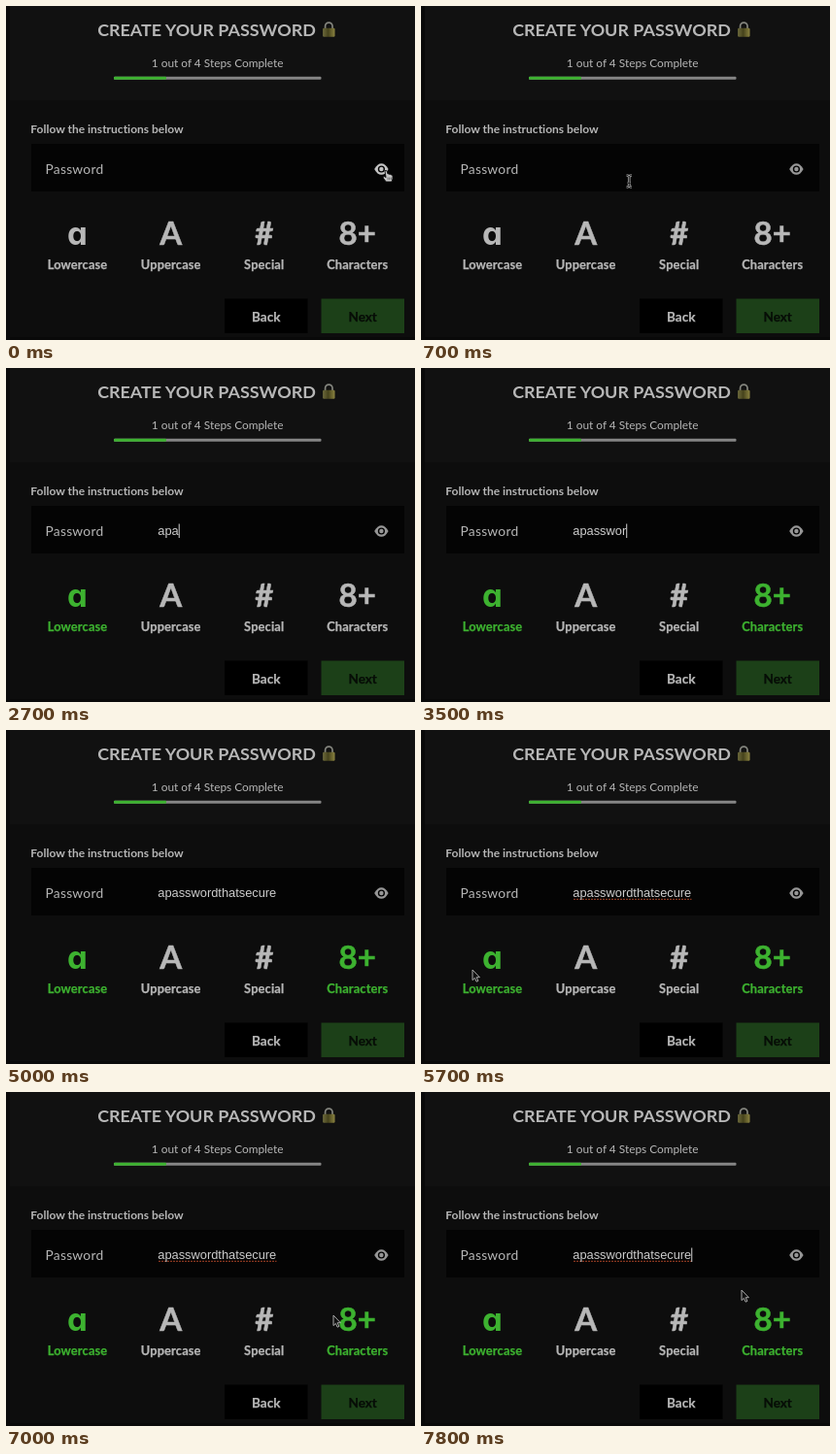
Animation, 421 px wide and 344 px high, one loop 8000 ms. Source, as an HTML page:

```html
<!DOCTYPE html>
<html lang="en">
<head>
<meta charset="utf-8">
<title>Create your password</title>
<style>
  html, body { margin: 0; width: 100%; height: 100%; overflow: hidden; background: #0a0a0a; }
  svg { display: block; width: 100vw; height: 100vh; color: #b7b7b7; }
  text { font-family: Lato, sans-serif; font-variant-ligatures: none; fill: currentColor; white-space: pre; }
  .bold, .rule { font-weight: 700; }
  .mid, .rule { text-anchor: middle; }
  .heavy { stroke: currentColor; stroke-width: .25px; }
  .sign { font-size: 33px; stroke: currentColor; stroke-width: .5px; }
  .single { font-family: Inter, "DejaVu Sans", sans-serif; stroke: none; }
  .label { font-size: 12.8px; letter-spacing: .15px; }
  .met { color: #3db230; }
  #typed { font: 12.84px "Liberation Sans", Arial, sans-serif; fill: #cdcdcd; }
</style>
</head>
<body>
<svg viewBox="0 0 421 344">
  <defs>
    <linearGradient id="brass">
      <stop stop-color="#6d6a3c"/><stop offset=".45" stop-color="#46431c"/><stop offset="1" stop-color="#8b8340"/>
    </linearGradient>
    <path id="beamShape" d="M-2.6-6Q-.5-6 0-4.8Q.5-6 2.6-6M0-4.8V4.8M-2.6 6Q-.5 6 0 4.8Q.5 6 2.6 6M-1.6 1.8H1.6"/>
  </defs>
  <rect width="421" height="344" fill="#090909"/>
  <rect x="4" width="417" height="341" fill="#0d0d0d"/>
  <rect x="4" width="417" height="97" fill="#111"/>

  <text class="bold mid" x="206.5" y="31.3" font-size="17.95">CREATE YOUR PASSWORD</text>
  <g transform="translate(-.7)">
    <path d="M329.3 24V20.8a3.7 3.7 0 0 1 7.4 0V24" fill="none" stroke="#85867f" stroke-width="1.7"/>
    <rect x="326.8" y="22.8" width="12.4" height="9" rx="1.2" fill="url(#brass)"/>
  </g>
  <text class="mid" x="217.7" y="63" font-size="11.85">1 out of 4 Steps Complete</text>
  <rect x="111" y="72.8" width="213.5" height="3" rx="1" fill="#858585"/>
  <rect x="111" y="72.8" width="54" height="3" rx="1" fill="#3db230"/>

  <text class="bold" x="25.3" y="131" font-size="12">Follow the instructions below</text>
  <rect x="26" y="142" width="384" height="49" fill="#040404"/>
  <text x="40.5" y="173" font-size="13.8" letter-spacing=".25">Password</text>
  <g id="eye" transform="translate(386.4 168)">
    <path d="M-7.2 0C-5.2-4-2.7-5.8 0-5.8S5.2-4 7.2 0C5.2 4 2.7 5.8 0 5.8S-5.2 4-7.2 0Z"/>
    <circle r="3.6" fill="#040404"/>
    <circle r="2.2"/>
  </g>
  <path id="spelling" d="M157 174.3H278.5" stroke="#86361f" stroke-width="1.2" stroke-dasharray="2 1"/>
  <text id="typed" x="156.3" y="172"></text>
  <rect id="caret" y="160.5" width="1" height="14.5" fill="#d0d0d0"/>

  <g class="rule" id="lower" transform="translate(73.5)">
    <text class="sign single" y="245.7">ɑ</text><text class="label heavy" y="270.5">Lowercase</text>
  </g>
  <g class="rule" transform="translate(169.7)">
    <text class="sign" y="245.7">A</text><text class="label heavy" y="270.5">Uppercase</text>
  </g>
  <g class="rule" transform="translate(265.7)">
    <text class="sign" y="245.7">#</text><text class="label heavy" y="270.5">Special</text>
  </g>
  <g class="rule" id="count" transform="translate(361.7)">
    <text class="sign" y="245.7">8+</text><text class="label heavy" y="270.5">Characters</text>
  </g>

  <rect x="225" y="301.5" width="85.5" height="35.5" fill="#000"/>
  <text class="bold mid heavy" x="267.7" y="325" font-size="13.5">Back</text>
  <rect x="324.5" y="301.5" width="85.5" height="35.5" fill="#1c4018"/>
  <text class="bold mid heavy" x="367.2" y="325" font-size="13.5" color="#070d07">Next</text>

  <g id="hand">
    <path d="M-2-5.2q1.2-1.2 2.1.2L1-2Q2-2.8 2.7-1.6Q4-2.3 4.4-1Q6-1.4 6 .4V3L5 6H-.8L-3.8 2Q-4-.2-2.2.7L-.9 1.6Z"
      fill="#c8c8c8" stroke="#111" stroke-width=".9"/>
    <path d="M1 1.5V4M2.7 1.5V4M4.3 1.5V4" stroke="#333" stroke-width=".6"/>
  </g>
  <g id="beam" fill="none">
    <use href="#beamShape" stroke="#a8a8a8" stroke-width="2.6"/>
    <use href="#beamShape" stroke="#161616" stroke-width="1"/>
  </g>
  <path id="arrow" d="M0 0V10.6L2.4 8.4L4.1 12.2L5.9 11.4L4.2 7.7H7.4Z" fill="#101010" stroke="#b0b0b0" stroke-width=".95"/>
</svg>
<script>
const LOOP = 8000, STEP = 100;
const WORD = "apasswordthatsecure";
// Time at which each letter of WORD is typed.
const KEYS = [2200, 2600, 2700, 2900, 3000, 3200, 3500, 3500, 3600, 3700,
  3800, 3900, 4000, 4200, 4300, 4400, 4500, 4600, 4700];
// Pointer stops: time, x, y.
const FIELD_PATH = [[200, 392, 175], [800, 200, 181], [1100, 200, 181], [1200, 197, 175]];
const RULES_PATH = [[5100, 197, 175], [5400, 92, 222], [5700, 53, 247], [5900, 58, 254],
  [6200, 105, 258], [6500, 205, 252], [6800, 308, 239], [7000, 337, 230],
  [7300, 384, 257], [7600, 350, 241], [7800, 330, 204]];

const el = id => document.getElementById(id);
const show = (id, on) => el(id).style.display = on ? "" : "none";

function along(path, t) {
  const next = path.findIndex(stop => stop[0] > t);
  if (next < 0) return path[path.length - 1].slice(1);
  if (next === 0) return path[0].slice(1);
  const [t0, x0, y0] = path[next - 1], [t1, x1, y1] = path[next];
  const p = (t - t0) / (t1 - t0), e = p * p * (3 - 2 * p);
  return [x0 + (x1 - x0) * e, y0 + (y1 - y0) * e];
}

function caretOn(t) {
  if (t < 1200) return false;
  if (t < 2100) return Math.min(3, Math.floor((t - 1200) / 200)) % 2 === 0;
  return t < 5000 || Math.floor((t - 5000) / 240) % 2 === 1;
}

function draw(t) {
  const length = KEYS.filter(k => k <= t).length;
  const typed = el("typed");
  typed.textContent = WORD.slice(0, length);
  el("caret").setAttribute("x", 156.3 + (length ? typed.getComputedTextLength() : 0));
  show("caret", caretOn(t));
  show("spelling", t >= 5100);
  el("lower").classList.toggle("met", length > 0);
  el("count").classList.toggle("met", length >= 8);
  el("eye").setAttribute("fill", t < 100 ? "#c4c4c4" : "#979797");

  const pointer = t < 300 ? "hand" : t < 2200 ? "beam" : t < 5100 ? "" : "arrow";
  for (const id of ["hand", "beam", "arrow"]) show(id, id === pointer);
  if (pointer) {
    const [x, y] = along(pointer === "arrow" ? RULES_PATH : FIELD_PATH, t);
    el(pointer).setAttribute("transform", `translate(${x} ${y})`);
  }
}

let start;
function tick(now) {
  start ??= now;
  draw(Math.floor((now - start) % LOOP / STEP) * STEP);
  requestAnimationFrame(tick);
}
draw(0);
requestAnimationFrame(tick);
</script>
</body>
</html>
```
